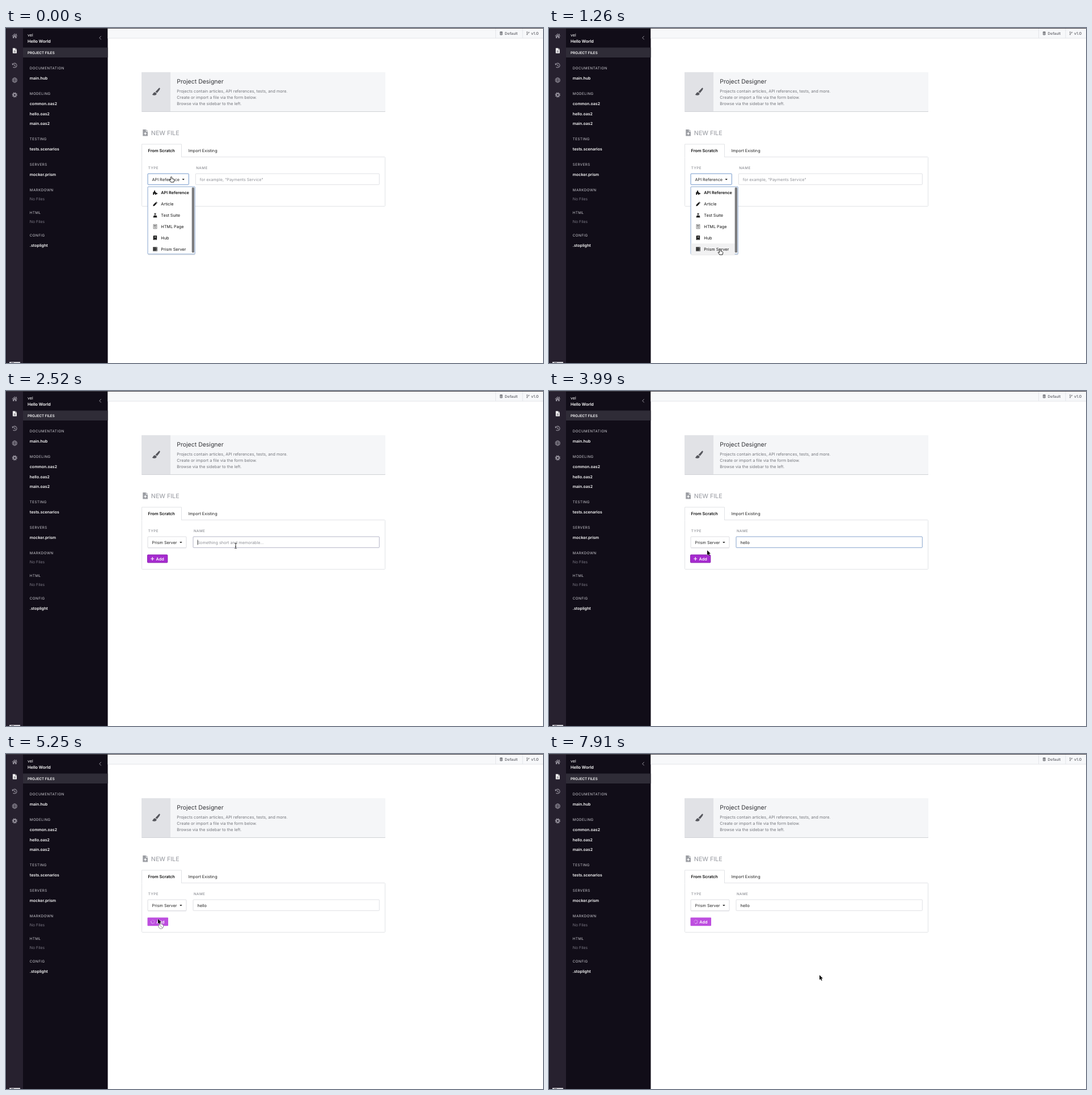
Animation, 947 px wide and 591 px high, one loop 8 s. Source, as an HTML page:

```html
<!DOCTYPE html>
<html lang="en">
<head>
<meta charset="utf-8">
<title>Project Designer</title>
<style>
  html, body { margin: 0; width: 100%; height: 100%; overflow: hidden; background: #fff; }
  svg { display: block; width: 100vw; height: 100vh; }
  text { font-family: Inter, "Open Sans", sans-serif; text-rendering: geometricPrecision; white-space: pre; }
</style>
</head>
<body>
<svg viewBox="0 0 947 591">
  <g id="page"></g>
  <g id="live"></g>
</svg>
<script>
const LOOP = 8000, TICK = 70;
const PICKED = 1750, FOCUSED = 2520, SUBMITTED = 4270;

// ---- drawing helpers (text y is the middle of the capitals) ----
const text = (x, y, s, fill = '#222', size = 7.25, weight = 400, spacing = 0) =>
  `<text x="${x}" y="${y + size * .36}" fill="${fill}" font-size="${size}" font-weight="${weight}" letter-spacing="${spacing}">${s}</text>`;
const label = (x, y, s, fill, weight = 400) => text(x, y, s, fill, 6.2, weight, .5);
const rect = (x, y, w, h, fill, more = '') =>
  `<rect x="${x}" y="${y}" width="${w}" height="${h}" fill="${fill}" ${more}/>`;
const box = (x, y, w, h, stroke, fill = '#fff') =>
  rect(x + .5, y + .5, w - 1, h - 1, fill, `stroke="${stroke}" rx="1"`);
const path = (d, fill, more = '') => `<path d="${d}" fill="${fill}" ${more}/>`;
const line = (d, stroke, width = 1, more = '') =>
  path(d, 'none', `stroke="${stroke}" stroke-width="${width}" ${more}`);
const at = (x, y, content, scale = 1) =>
  `<g transform="translate(${x} ${y}) scale(${scale})">${content}</g>`;

// ---- icons, centred on 0,0 in a 10 unit square ----
const icons = {
  home: c => path('M0-4.6 5.2 0 4.5.8 0-3.2-4.5.8-5.2 0zM2.6-4H4V-1.4L2.6-2.6zM0-2.2 3.6 1V4.4H1V1.6H-1V4.4H-3.6V1z', c),
  file: c => path('M-3.7-5H1V-1.8H3.9V5H-3.7zM1.7-5 3.9-2.5H1.7z', c) + line('M-2 .4H2.2M-2 2.5H2.2', '#27212f', .8),
  history: c => line('M-3.3-2.8A4.2 4.2 0 1 1-3 3M0-2.3V.4L1.8 1.7', c, 1.2) + path('M-4.9-4.6V-.9H-1.2z', c),
  globe: c => `<circle r="4.4" fill="none" stroke="${c}"/><ellipse rx="2" ry="4.4" fill="none" stroke="${c}"/>` +
    line('M-4-1.5H4M-4 1.5H4', c, .9),
  gear: c => `<circle r="2.7" fill="none" stroke="${c}" stroke-width="2"/>` +
    `<circle r="4.3" fill="none" stroke="${c}" stroke-width="1.5" stroke-dasharray="1.8 1.577"/>`,
  database: c => path('M-4-3.2C-4-5.4 4-5.4 4-3.2V3.4C4 5.6-4 5.6-4 3.4z', c) +
    line('M-4-1.7C-3 0 3 0 4-1.7M-4 1.2C-3 3 3 3 4 1.2', '#f7f8fa', 1),
  branch: c => line('M-2.5-2.5V2.5M2.5-1.8C2.5.8-2.5-.2-2.5 2.2', c, 1.2) +
    ['-2.5" cy="-3.4', '-2.5" cy="3.4', '2.5" cy="-2.6'].map(p => `<circle cx="${p}" r="1.4" fill="${c}"/>`).join(''),
  brush: c => path('M4.7-4.8C5.6-4.1 4.9-3 4.2-2L1.3 1.6-.7 0 3-4C3.6-4.7 4.2-5.2 4.7-4.8zM-1.2.5.8 2.2C.8 4.6-2.4 5.3-5 3.6-3.4 3.4-3.7.5-1.2.5z', c),
  fileAdd: c => path('M-3.8-5H1V-1.8H3.8V5H-3.8zM1.7-5 3.8-2.5H1.7z', c) + line('M0-.7V3.3M-2 1.3H2', '#fff', 1.1),
  puzzle: c => path('M-4.8-1.5H-2.6C-1.6-2-3.2-2.7-2.7-4-2-5.2.2-5 .3-3.6.3-2.5-.8-2-.2-1.5H2.2V.7C2.7 1.4 3.2.2 4.2.4 5.5 1 5.3 3 4.1 3.3 3 3.4 2.7 2.3 2.2 3V4.8H-.2C-.5 4 .4 3.6 0 2.8-.6 2-2.2 2.1-2.5 3-2.7 3.8-1.8 4-2.2 4.8H-4.8z', c),
  pencil: c => path('M-4.8 4.8-4.1 1.6 1.2-3.7 3.7-1.2-1.6 4.1zM1.9-4.3 3-5 5 -3 4.3-1.9z', c),
  flask: c => path('M-2.2-4.8H2.2V-3.6H1.5V-1L4.4 3.6Q4.7 4.8 3.5 4.8H-3.5Q-4.7 4.8-4.4 3.6L-1.5-1V-3.6H-2.2z', c) +
    path('M-.5-3.6H.5V-.7L1.6 1H-1.6L-.5-.7z', '#fff'),
  markup: c => line('M-3.8-4.7H3.8V4.7H-3.8z', c, .8, 'stroke-dasharray="2 .6"') +
    line('M-1.7-3.2V0M1.5-3.2V0M-2 2.2H2.2M-1.6-1.6H1.5', c, 1),
  book: c => path('M-2.9-5H4V3H3.6V4.2H4V5H-2.9C-4.6 5-4.6 3.6-4.3 3V-3.5Q-4.3-5-2.9-5z', c) +
    line('M-1.8-2.6H2.2M-1.8-1H2.2M-3 3.6H3', '#fff', .8),
  server: c => [-4.5, -1.3, 1.9].map(y => rect(-5, y, 10, 2.6, c, 'rx=".5"') + rect(2.3, y + .9, 1.6, .8, '#fff')).join('')
};
const icon = (name, x, y, color, scale = 1) => at(x, y, icons[name](color), scale);

// ---- fixed page ----
function drawPage() {
  const groups = [
    [71, 'DOCUMENTATION', ['main.hub']],
    [116, 'MODELING', ['common.oas2', 'hello.oas2', 'main.oas2']],
    [196, 'TESTING', ['tests.scenarios']],
    [241, 'SERVERS', ['mocker.prism']],
    [286, 'MARKDOWN', []],
    [326, 'HTML', []],
    [366, 'CONFIG', ['.stoplight']]
  ];
  const sidebar = groups.map(([y, title, files]) =>
    label(41.8, y, title, '#cfced4') + (files.length
      ? files.map((f, i) => text(41.8, y + 17.3 + i * 17.8, f, '#fff', 7, 600)).join('')
      : text(41.8, y + 15.7, 'No Files', '#7b7884', 6.9))).join('');
  const rail = ['home', 'file', 'history', 'globe', 'gear'].map((name, i) =>
    icon(name, 15.3, 14 + i * 26, name === 'file' ? '#fff' : '#96929d', .92)).join('');

  return rect(0, 0, 30, 591, '#27212f') + rect(30, 0, 149.5, 591, '#110d18') + rect(0, 0, .8, 591, '#17131d') +
    rect(30, 34.5, 149.5, 17.5, '#2f2c37') + rail +
    rect(6, 589, 19, 2, '#d4d2d8') + rect(9, 590, 5, 1, '#5d5964') +
    text(38, 12.3, 'vel', '#fff', 7.1) + text(38, 23.5, 'Hello World', '#fff', 7.3, 600) +
    text(38, 43.6, 'PROJECT FILES', '#fff', 6.3, 600) +
    line('M167.7 14.3 164.7 17.3 167.7 20.3', '#aaa7b0', .9) + sidebar +
    rect(179.5, 0, 767.5, 18, '#f7f8fa') + rect(179.5, 17.5, 767.5, 1, '#e4e5e9') +
    rect(863, 1, 1, 17, '#e4e5e9') + rect(910.5, 1, 1, 17, '#e4e5e9') + rect(0, 0, 947, 1, '#3b3940') +
    icon('database', 873.3, 9.3, '#6f7076', .62) + text(879.6, 9.5, 'Default', '#6f7076', 6.5, 600) +
    icon('branch', 920.5, 9.3, '#6f7076', .62) + text(926, 9.5, 'v1.0', '#6f7076', 6.8, 600) +
    rect(239, 79, 430, 69, '#cfd1d5', 'rx="1"') + rect(239, 78, 430, 69, '#f5f6f8', 'rx="1"') +
    rect(239, 78, 51, 69, '#e1e2e6') + icon('brush', 264.5, 112.5, '#55565c', 1.4) +
    text(301.3, 94.2, 'Project Designer', '#333438', 10.5) +
    ['Projects contain articles, API references, tests, and more.', 'Create or import a file via the form below.',
      'Browse via the sidebar to the left.'].map((s, i) => text(301.3, 111.6 + i * 11.1, s, '#74767c', 7.23)).join('') +
    icon('fileAdd', 245.6, 184.7, '#9c9ea4', 1.15) + text(255.8, 184.9, 'NEW FILE', '#a3a5ab', 10.7, 500) +
    box(239, 227, 430, 88, '#e1e3e6') + line('M239.5 228V205H309.5V227', '#e1e3e6') + rect(240, 226, 69, 3, '#fff') +
    text(250.6, 216.5, 'From Scratch', '#111', 7.35, 600) + text(321.5, 216.5, 'Import Existing', '#222') +
    label(250.8, 247.2, 'TYPE', '#8b8d93', 500);
}

// ---- moving parts ----
const ease = p => p * p * (3 - 2 * p);
const stops = [ // time, x, y of the pointer tip
  [0, 291.5, 262], [70, 292, 264], [770, 308.5, 353], [1050, 310, 379], [1330, 300, 392], [1750, 300, 392],
  [2100, 405, 273], [3850, 405, 273], [3920, 330, 279], [3990, 279, 281], [4130, 268, 291],
  [5460, 268, 291], [5880, 477, 390], [LOOP, 477, 390]
];
function pointerAt(t) {
  const i = stops.findIndex(s => s[0] > t);
  const [t0, x0, y0] = stops[i - 1], [t1, x1, y1] = stops[i];
  const p = ease((t - t0) / (t1 - t0));
  return [x0 + (x1 - x0) * p, y0 + (y1 - y0) * p];
}

const arrow = path('M0 0V8.4L1.9 6.7 3.3 9.8 4.7 9.2 3.3 6.1H5.9z', '#000', 'stroke="#fff" stroke-width=".7" paint-order="stroke"');
const hand = path('M-1.1 1Q0-.9 1.1 1V3.7L4.2 4.5Q5.4 5 5.2 6.6L4.4 10H-.7L-3.2 6.6Q-3.6 5.2-2.2 5.4L-1.1 6.4z', '#fff', 'stroke="#111" stroke-width=".9"');
const beam = line('M-1.8-4.5Q0-4.5 0-3.5 0-4.5 1.8-4.5M0-3.5V3.7M-1.8 4.7Q0 4.7 0 3.7 0 4.7 1.8 4.7M-1 1.2H1', '#222', .9);
const blocked = arrow + at(5.3, 13, '<circle r="4.3" fill="#fff" stroke="#8d8d90"/>' + line('M-3-3 3 3', '#8d8d90'));

function drawPointer(t, x, y) {
  if (t >= 2870 && t < 3920) return '';
  const overButton = x > 249 && x < 286 && y > 289 && y < 304;
  const overInput = x > 330 && x < 658 && y > 257 && y < 277;
  const shape = t < PICKED ? hand
    : overButton ? (t < SUBMITTED ? hand : blocked)
    : overInput ? beam : arrow;
  return at(x, y, shape);
}

function drawMenu(y) {
  const items = [['puzzle', 'API Reference'], ['pencil', 'Article'], ['flask', 'Test Suite'],
    ['markup', 'HTML Page'], ['book', 'Hub'], ['server', 'Prism Server']];
  const hovered = Math.floor((y - 280.7) / 19.9);
  return rect(250, 281, 84, 120, '#000', 'opacity=".08" rx="2"') + box(249.5, 279.5, 84.2, 119.8, '#86a5cf') +
    items.map(([name, s], i) => {
      const mid = 290.6 + i * 19.9;
      return (i === hovered ? rect(250.5, mid - 9.9, 77, 19.9, '#f1f1f2') : '') +
        icon(name, 263, mid, '#111', .78) + text(273.3, mid, s, '#111', 7.25, i ? 400 : 600);
    }).join('') + rect(327.7, 281.2, 4.3, 115, '#7c7c7e', 'rx="1.5"');
}

function drawButton(t, hover) {
  if (t < SUBMITTED)
    return box(249, 288.5, 36.3, 14.8, '#8a1cb0', hover ? '#9522bd' : '#a62bcf') +
      line('M258.2 293V299M255.2 296H261.2', '#fff', 1.2) + text(264.6, 296.2, 'Add', '#fff', 7.2, 600);
  const turn = Math.floor((t - SUBMITTED) / 125) * 45;
  const spokes = Array.from({ length: 8 }, (_, i) =>
    line('M0-2.3V-3.8', '#fff', 1.1, `transform="rotate(${turn + i * 45})" opacity="${.25 + i * .1}"`)).join('');
  return rect(249.5, 288.5, 36.5, 14.8, '#bd4edf', 'rx="1"') + at(258.8, 296, spokes) +
    text(265.3, 296.2, 'Add', '#fff', 7.2, 600);
}

function drawForm(t, x, y) {
  const open = t < PICKED, shift = open ? 4.3 : 0, left = 329.5 + shift;
  const focused = t >= FOCUSED && t < SUBMITTED;
  const border = !focused ? '#dfe0e4' : t < FOCUSED + TICK ? '#b3b5c6' : '#86a3cd';
  const typed = 'hello'.slice(0, t < 2870 ? 0 : Math.floor((t - 2870) / 140) + 1);
  const hint = open ? 'for example, "Payments Service"' : 'Something short and memorable...';
  const caretX = 338 + [0, 4.3, 8.6, 10.4, 12.2, 16.7][typed.length];
  const caretOn = focused && t < 3710;
  const selectWidth = open ? 73.3 : 69;
  return label(330.9 + shift, 247.2, 'NAME', '#8b8d93', 500) +
    (open ? '' : rect(250, 258, selectWidth - 1, 19.7, '#ececef', 'rx="1"')) +
    box(249.5, 256.5, selectWidth, 20.3, open ? '#7398cb' : '#dcdde1') +
    text(257.5, 267.2, open ? 'API Reference' : 'Prism Server', '#222') +
    at(308.4 + shift, 266.4, path('M-2.2-.3H2.2L0 2z', '#222')) +
    box(left, 256.5, 658.8 - left, 20.3, border) +
    (typed ? text(337.5, 267.2, typed, '#222') : text(337.5 + shift, 267.2, hint, '#8f9197', 7.2)) +
    (caretOn ? rect(caretX - .4, 262.5, .8, 9, '#222') : '') +
    (open ? drawMenu(y) : drawButton(t, x < 286 && y > 289 && y < 304));
}

const live = document.getElementById('live');
document.getElementById('page').innerHTML = drawPage();
let shown = -1;
function render() {
  const t = Math.floor(performance.now() % LOOP / TICK) * TICK;
  if (t !== shown) {
    const [x, y] = pointerAt(t);
    live.innerHTML = drawForm(t, x, y) + drawPointer(t, x, y);
    shown = t;
  }
  requestAnimationFrame(render);
}
render();
</script>
</body>
</html>
```
